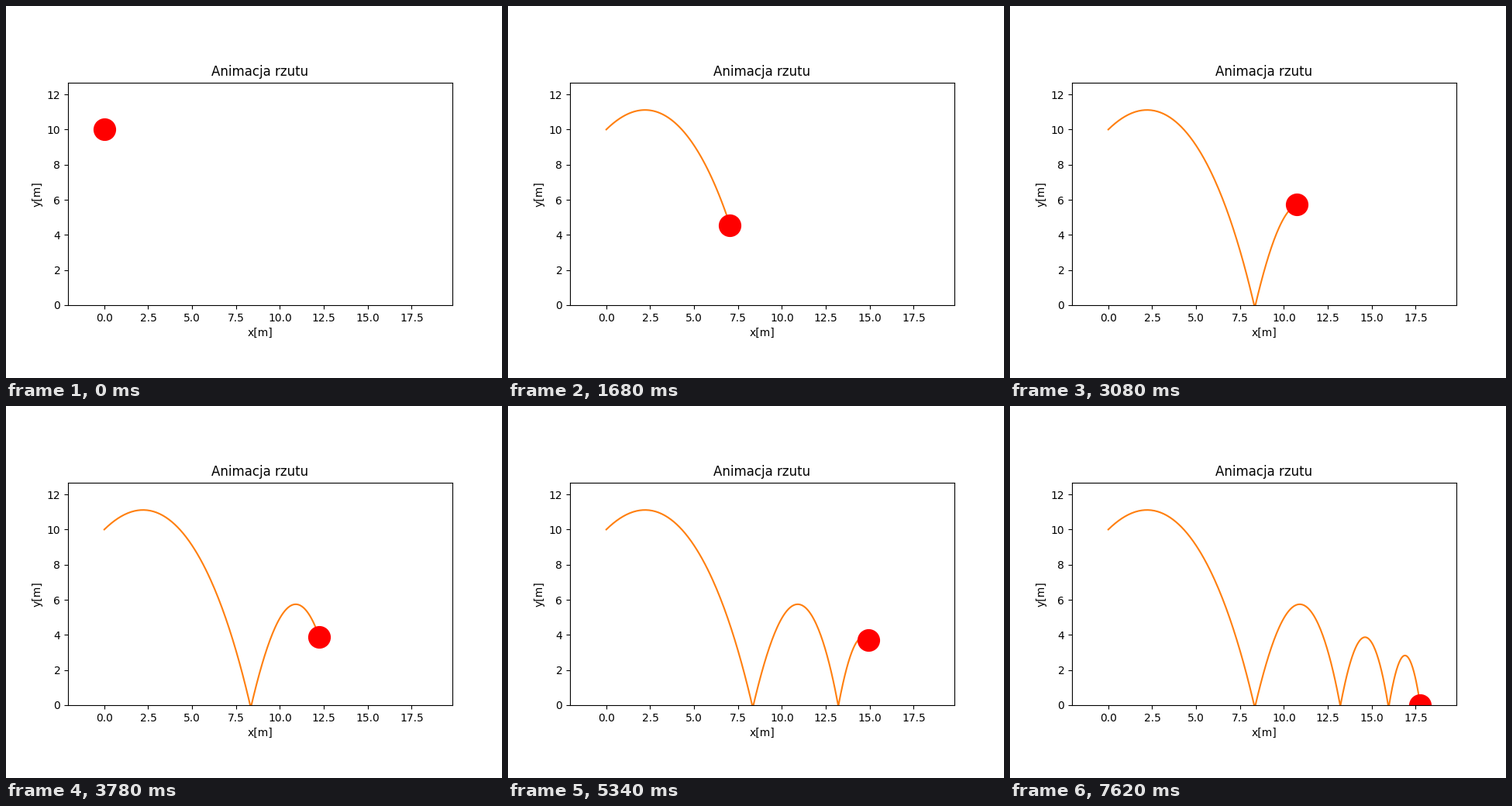
A matplotlib script for the animation above (7640 ms loop, 640 px wide and 480 px high).

```python
import numpy as np
import matplotlib.pyplot as plt
from matplotlib.animation import FuncAnimation

FRAMES = 382
DT = 0.02
G = 9.81
SPEED, ANGLE, HEIGHT = 7, np.radians(45), 10

# step: (x, y) in metres, used to choose the air drag
KEYS = {78: (6.627, 5.737), 195: (12.496, 3.089),
        273: (15.1, 3.398), 381: (17.755, 0)}


def throw(drag):
    """Positions of a bouncing ball with quadratic drag, one row per step."""
    vx = SPEED * np.cos(ANGLE) + 0 * drag
    vy = SPEED * np.sin(ANGLE) + 0 * drag
    x, y = 0 * drag, HEIGHT + 0 * drag
    path = []
    for _ in range(FRAMES):
        path.append((x, y))
        k = drag * np.hypot(vx, vy)
        vx = vx - k * vx * DT
        vy = vy - (G + k * vy) * DT
        x = x + vx * DT
        y = y + vy * DT
        vy = np.where(y < 0, np.abs(vy), vy)
    return np.array(path)


# Try a range of drags at once and keep the best path.
paths = throw(np.linspace(0.033, 0.038, 501))
goals = np.array(list(KEYS.values()))[:, :, None]
errors = ((paths[list(KEYS)] - goals) ** 2).sum(axis=(0, 1))
xs, ys = paths[:, :, errors.argmin()].T

fig, ax = plt.subplots(figsize=(6.4, 4.8), dpi=100)
ax.set(xlim=(-2.0666, 19.8222), ylim=(0, 12.674), aspect="equal",
       xlabel="x[m]", ylabel="y[m]", title="Animacja rzutu")
trail, = ax.plot([], [], color="C1", lw=1.5)
ball, = ax.plot([], [], "o", color="red", ms=20)


def update(i):
    trail.set_data(xs[:i + 1], ys[:i + 1])
    ball.set_data(xs[i:i + 1], ys[i:i + 1])
    return trail, ball


anim = FuncAnimation(fig, update, frames=FRAMES, interval=20,
                     repeat=True, repeat_delay=0)
plt.show()
```
